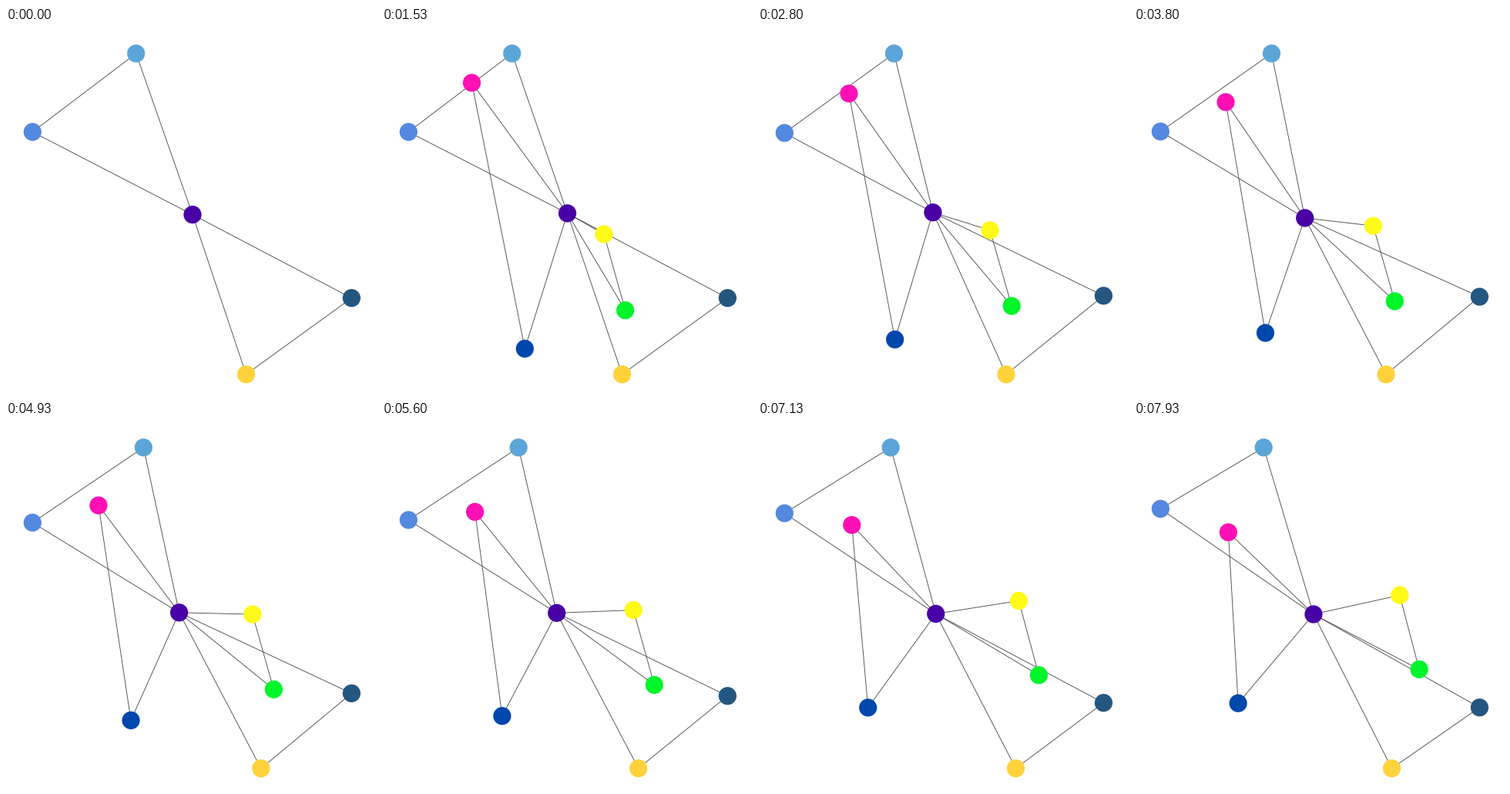
These frames come from a looping animation (480x474 px, 8 s). A matplotlib script:

```python
import numpy as np
import matplotlib.pyplot as plt
from matplotlib.animation import FuncAnimation
from matplotlib.collections import LineCollection
from matplotlib.patches import Circle

W, H, DPI = 480, 474, 64
FRAMES, LOOP = 120, 8000
GROW = 22          # frame at which the second group joins the graph
RADIUS = 11.6
REST = (242, 241.7)     # hub of the small graph

# name: (colour, start, end, bow); bow is the push away from the straight path
NODES = {
    "hub":   ("#4800a6", (240.5, 240), (233, 249), (0, 0)),
    "sky":   ("#5ca5d8", (168.7, 33), (168, 33), (10.3, 0)),
    "left":  ("#5588df", (34.4, 134.6), (34.4, 112.2), (0, 7.7)),
    "right": ("#24567f", (448.3, 349.7), (448.3, 370), (0, -9.2)),
    "gold":  ("#ffd23c", (311.5, 448.6), (334.4, 448.6), (7.5, 0)),
    "pink":  ("#ff10b6", (116.5, 71), (122.4, 143.2), (0.4, -1)),
    "navy":  ("#0048ac", (185.3, 415.3), (134.8, 364), (3.4, -2)),
    "lemon": ("#fffa18", (288, 267), (345, 224), (1.9, 4.8)),
    "green": ("#00f52a", (315.6, 365.6), (370.2, 320), (3.1, 4.8)),
}
NAMES = list(NODES)
FIRST = 5          # nodes present from the start

# Pairs of neighbours form triangles with the hub.
SIDES = [("sky", "left"), ("right", "gold"), ("pink", "navy"), ("lemon", "green")]
EDGES = [edge for a, b in SIDES for edge in (("hub", a), ("hub", b), (a, b))]
PAIRS = [(NAMES.index(a), NAMES.index(b)) for a, b in EDGES]
FIRST_EDGES = 6

START, END, BOW = (np.array([spec[k] for spec in NODES.values()], dtype=float)
                   for k in (1, 2, 3))


def hub_path(u):
    """The hub is shoved aside early, then drifts back slowly."""
    keys = (0, 0.2, 0.35, 1)
    return (np.interp(u, keys, (240.5, 227, 221.5, 233)),
            np.interp(u, keys, (240, 238.7, 246, 249)))


def layout(i):
    if i < GROW:
        pos = START.copy()
        pos[0] = REST
        return pos
    u = max(0, (i - GROW - 0.5) / (FRAMES - GROW - 2))
    v = u ** 0.85
    pos = START + (END - START) * u + BOW * 4 * v * (1 - v)
    pos[0] = hub_path(u)
    return pos


fig = plt.figure(figsize=(W / DPI, H / DPI), dpi=DPI, facecolor="white")
ax = fig.add_axes([0, 0, 1, 1])
ax.set_xlim(0, W)
ax.set_ylim(H, 0)
ax.axis("off")

lines = LineCollection([], colors="#505050", linewidths=0.92 * 72 / DPI, zorder=1)
ax.add_collection(lines)
discs = [ax.add_patch(Circle((0, 0), RADIUS, fc=spec[0], lw=0, zorder=2))
         for spec in NODES.values()]


def draw(i):
    grown = i >= GROW
    pos = layout(i)
    pairs = PAIRS if grown else PAIRS[:FIRST_EDGES]
    lines.set_segments([pos[[a, b]] for a, b in pairs])
    for k, disc in enumerate(discs):
        disc.center = pos[k]
        disc.set_visible(grown or k < FIRST)
    return [lines, *discs]


anim = FuncAnimation(fig, draw, frames=FRAMES, interval=LOOP / FRAMES,
                     init_func=lambda: draw(0), repeat=True, repeat_delay=0)
plt.show()
```
